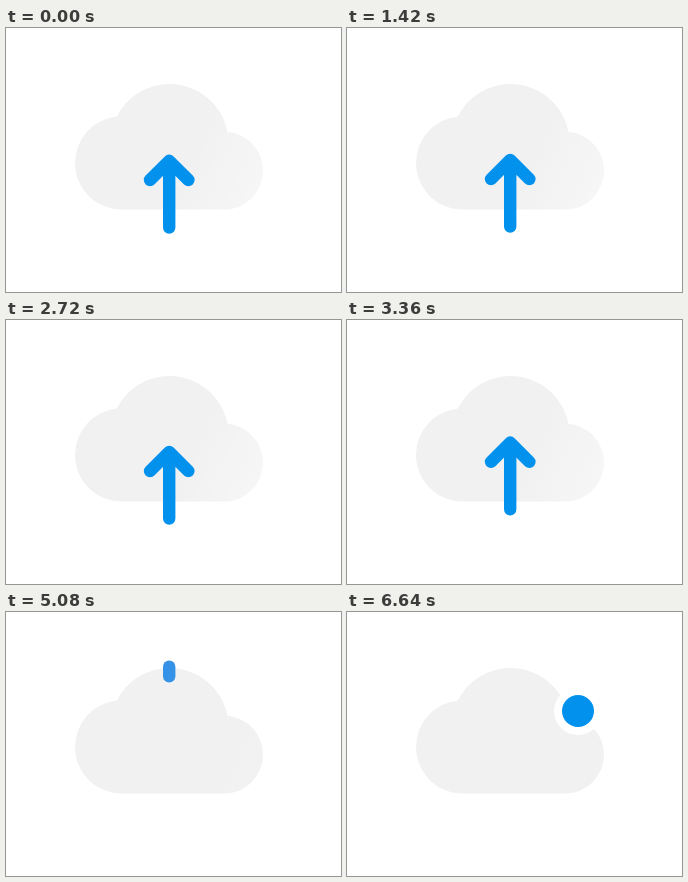
An HTML page for the animation above (7.2 s loop, 335x264 px).

```html
<!DOCTYPE html>
<html lang="en">
<head>
<meta charset="utf-8">
<title>Cloud upload</title>
<style>
  html, body { margin: 0; width: 100%; height: 100%; overflow: hidden; background: #fff; }
  svg { display: block; width: 335px; height: 264px; }
</style>
</head>
<body>
<svg viewBox="0 0 335 264">
  <defs>
    <linearGradient id="sheen" gradientUnits="userSpaceOnUse" x1="185" y1="130" x2="257" y2="160">
      <stop stop-color="#fff" stop-opacity="0"/>
      <stop offset="1" stop-color="#fff" stop-opacity=".4"/>
    </linearGradient>
    <clipPath id="cloud">
      <circle cx="115.7" cy="134.9" r="46.7"/>
      <circle cx="163.5" cy="115" r="59"/>
      <circle cx="218" cy="142.6" r="39"/>
      <rect x="115.7" y="115" width="102.3" height="66.6"/>
    </clipPath>
  </defs>
  <g clip-path="url(#cloud)">
    <rect width="335" height="264" fill="#f1f1f1"/>
    <rect id="shine" width="335" height="264" fill="url(#sheen)"/>
  </g>
  <path id="arrow" fill="none" stroke-width="12.4" stroke-linecap="round" stroke-linejoin="round"/>
  <g id="ball">
    <circle r="24" fill="#fff"/>
    <circle r="16" fill="#0292ee"/>
  </g>
</svg>
<script>
const LOOP = 7200, BOB = 1300, TOP = 3.5 * BOB, GONE = 5340, POP = 5510;
const shine = document.getElementById('shine');
const arrow = document.getElementById('arrow');
const ball = document.getElementById('ball');

const mix = (a, b, p) => a + (b - a) * p;

// Goes from 0 to 1 between two times, slow at both ends.
function ease(t, from, to) {
  const x = Math.min(1, Math.max(0, (t - from) / (to - from)));
  return (1 - Math.cos(Math.PI * x)) / 2;
}

function drawArrow(t) {
  // Bobs until the last peak, then shrinks upwards out of the cloud.
  const lift = 5.5 * (1 - Math.cos(2 * Math.PI * Math.min(t, TOP) / BOB));
  const exit = ease(t, 4400, 5300);
  const tip = 132.8 - lift - 78 * exit;
  const tail = 199.5 - lift - 144.3 * exit;
  const wing = 19.2 * (1 - ease(t, 4100, 4700));
  const head = wing > 0.1 ? `m${-wing} ${wing}l${wing} ${-wing}l${wing} ${wing}` : '';
  arrow.setAttribute('d', `M163.2 ${tail}V${tip}${head}`);
  arrow.setAttribute('stroke', `rgb(${mix(2, 62, exit)}, 146, ${mix(238, 229, exit)})`);
  arrow.setAttribute('opacity', 1 - ease(t, 5160, GONE));
  shine.setAttribute('opacity', 1 - exit);
}

function drawBall(t) {
  // Rises to its peak, then falls past its resting place and settles.
  const rise = ease(t, 5600, 6060);
  const fall = 1.23 * ease(t, 6060, 6430) - 0.23 * ease(t, 6430, 6640);
  const x = mix(mix(226, 243.2, rise), 231, fall);
  const y = mix(mix(92, 79, rise), 99, fall);
  ball.setAttribute('transform', `translate(${x} ${y}) scale(${ease(t, POP, 5700)})`);
  ball.setAttribute('visibility', t > POP ? 'visible' : 'hidden');
}

function frame() {
  const t = performance.now() % LOOP;
  drawArrow(t);
  drawBall(t);
  requestAnimationFrame(frame);
}
frame();
</script>
</body>
</html>
```
